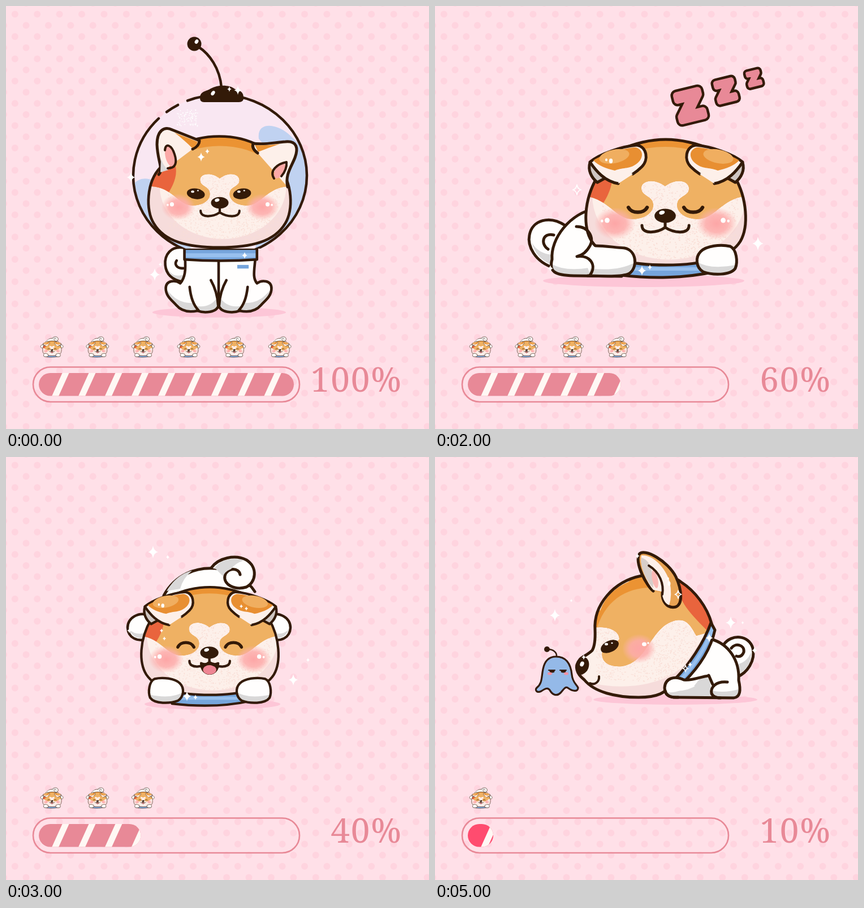
These frames come from a looping animation (748x748 px, 6000 ms). An HTML page with a canvas:

```html
<!DOCTYPE html>
<html lang="en">
<head>
<meta charset="utf-8">
<title>Puppy battery</title>
<style>
html, body { margin: 0; width: 100%; height: 100%; overflow: hidden; background: #ffe0e8; }
canvas { display: block; width: 100vw; height: 100vh; }
</style>
</head>
<body>
<canvas id="stage" width="748" height="748"></canvas>
<script>
const ctx = document.getElementById('stage').getContext('2d');
const INK = '#331a08', WHITE = '#fffefd', GRAY = '#d9d8d8', CREAM = '#fdf0ea', SHADE = '#f6dcdb';
const ORANGE = '#efb163', DEEP = '#eb9333', RED = '#e9643d', BLUE = '#76a5dc', SKY = '#98c0ee';
const PINK = '#e88997';

// ---- drawing helpers ----
function scope(fn) { ctx.save(); fn(); ctx.restore(); }
function fill(d, color) { ctx.fillStyle = color; ctx.fill(new Path2D(d)); }
function line(d, w = 5, color = INK) {
  ctx.lineWidth = w; ctx.strokeStyle = color; ctx.stroke(new Path2D(d));
}
function shape(d, color, w) { fill(d, color); line(d, w); }
function inside(d, fn) { scope(() => { ctx.clip(new Path2D(d)); fn(); }); }
function oval(x, y, rx, ry, color, turn = 0) {
  ctx.fillStyle = color;
  ctx.beginPath(); ctx.ellipse(x, y, rx, ry, turn, 0, 7); ctx.fill();
}
function box(x, y, w, h, color) { ctx.fillStyle = color; ctx.fillRect(x, y, w, h); }
function at(x, y, k, fn, px = 336, py = 271) {
  scope(() => { ctx.translate(x, y); ctx.scale(k, k); ctx.translate(-px, -py); fn(); });
}
function pair(cx, fn) {
  fn();
  scope(() => { ctx.translate(2 * cx, 0); ctx.scale(-1, 1); fn(); });
}
function starPath(x, y, r) {
  const q = r * 0.14, s = r * 0.82;
  return `M${x},${y - r} Q${x + q},${y - q} ${x + s},${y} Q${x + q},${y + q} ${x},${y + r}` +
    ` Q${x - q},${y + q} ${x - s},${y} Q${x - q},${y - q} ${x},${y - r}Z`;
}
function stars(...list) { for (const [x, y, r] of list) fill(starPath(x, y, r), '#fff'); }
function blush(x, y, rx, ry) {
  scope(() => {
    ctx.translate(x, y); ctx.scale(rx, ry);
    const g = ctx.createRadialGradient(0, 0, 0, 0, 0, 1);
    g.addColorStop(0, 'rgba(253,166,166,1)');
    g.addColorStop(0.55, 'rgba(253,172,171,.85)');
    g.addColorStop(1, 'rgba(253,180,178,0)');
    oval(0, 0, 1, 1, g);
  });
}
function speckle(x, y, w, h, n, color) {
  let seed = 7;
  const rnd = () => (seed = (seed * 16807) % 2147483647) / 2147483647;
  for (let i = 0; i < n; i++) box(x + rnd() * w, y + rnd() * h, 1.7, 1.4, color);
}
function eye(x, y, turn) {
  oval(x, y, 17, 10, INK, turn);
  oval(x - 6, y - 4, 3, 2.2, '#fff');
  oval(x + 4, y - 6, 1.6, 1.3, '#fff');
}
function shadow(x, y, rx, ry) { oval(x, y, rx, ry, '#fdc6d7'); }

// ---- front face, nose at 336,271 ----
const MASK = 'M180,242 L206,240 C248,242 258,276 285,276 C308,276 322,262 316,248 C312,240 299,239 299,228' +
  ' C299,216 319,212 336,225 C353,212 373,216 373,229 C373,239 361,240 356,248 C350,262 364,276 387,276' +
  ' C414,276 424,242 466,240 L500,242 L500,120 L180,120Z';

function coat() {
  box(150, 100, 380, 280, SHADE);
  oval(342, 240, 119, 99, CREAM);
  speckle(238, 220, 210, 122, 1300, '#f9ded6');
  fill(MASK, DEEP);
  inside(MASK, () => {
    oval(336, 268, 134, 104, ORANGE);
    fill('M180,260 H234 C246,244 257,222 253,203 L215,195Z', RED);
  });
}
function face(kind, by) {
  blush(258, by, 32, 25);
  blush(416, by, 32, 25);
  oval(246, by - 5, 3.8, 4, '#fff'); oval(238, by - 4, 2, 2.2, '#fff');
  oval(426, by - 5, 3.8, 4, '#fff'); oval(434, by - 4, 2, 2.2, '#fff');
  if (kind === 'open') {
    eye(291, 254, 0.15);
    eye(378, 254, -0.15);
  } else {
    const d = kind === 'sleep' ? 'M279,258 C284,268 303,268 308,258' : 'M279,261 C284,250 303,250 308,261';
    pair(336.5, () => line(d, 5.5));
  }
  if (kind === 'happy') {
    shape('M321,290 C321,315 352,315 352,290 Q344,294 336,288 Q329,294 321,290Z', INK, 4);
    oval(336.5, 302, 12, 8.5, '#ee8593');
  }
  oval(336, 271, 16.5, 11, INK);
  oval(331, 266, 4.5, 3, '#fff', -0.3);
  line('M336,280 V288 M300,286 C300,301 325,297 336,289 C348,297 373,301 373,286', 4.4);
}
function head(outline, x, y, k, kind, by) {
  inside(outline, () => at(x, y, k, coat));
  line(outline);
  at(x, y, k, () => face(kind, by));
}
const ROUND = 'M224,205 C198,232 196,285 212,310 C232,344 275,355 335,355 C396,355 439,344 459,310' +
  ' C475,285 473,232 447,205 C440,175 395,146 335,146 C275,146 232,175 224,205Z';

// ---- sitting front body ----
function sitting() {
  shadow(334, 476, 129, 10);
  shape('M268,352 C240,346 228,366 230,385 C232,405 246,414 264,417', WHITE);
  fill('M234,391 C244,409 255,405 265,404 L264,414 C250,412 239,406 234,391Z', GRAY);
  line('M265,391 C252,392 247,383 252,376');
  const body = 'M268,370 C270,395 268,409 259,420 C249,413 231,414 231,430 C231,445 243,453 251,462' +
    ' C262,475 278,476 292,473 C305,478 330,477 333,462 C336,477 361,478 374,473 C388,476 404,475 415,462' +
    ' C423,453 435,445 435,430 C435,414 417,413 407,420 C398,409 402,395 404,370Z';
  fill(body, WHITE);
  inside(body, () => pair(333, () => {
    fill('M225,425 C238,434 246,458 282,458 L294,480 L230,480Z', GRAY);
    fill('M292,464 Q316,468 330,448 L332,482 L290,482Z', GRAY);
  }));
  line(body);
  line('M333,377 V466');
  pair(333, () => line('M277,427 C279,446 284,462 294,472 M318,414 C327,430 331,446 332,462'));
  box(369, 384.5, 22, 7, BLUE);
  collar('M267,353 H407 V374 Q337,379 267,374Z', () => box(260, 362, 150, 8, SKY));
}
function collar(d, band) {
  fill(d, BLUE);
  inside(d, band);
  line(d);
}

// ---- scenes ----
function astronaut() {
  at(376, 429, 0.916, sitting, 333, 353);
  const glass = (a, b) => {
    ctx.beginPath();
    ctx.ellipse(378.5, 300, 153.5, 143, 0, a * Math.PI / 180, b * Math.PI / 180);
  };
  scope(() => {
    ctx.beginPath(); ctx.rect(200, 140, 360, 289); ctx.clip();
    glass(0, 360); ctx.fillStyle = '#f9e7f2'; ctx.fill();
    scope(() => {
      ctx.clip();
      fill('M447,235 C443,205 475,207 498,225 C516,240 532,260 540,290 L520,390 L440,435 L470,260Z', '#c0d2f1');
      fill('M220,322 C235,298 258,302 275,320 L330,435 L280,430Z', '#c0d2f1');
      speckle(302, 182, 36, 30, 90, '#fff');
    });
    ctx.lineWidth = 4.5; ctx.strokeStyle = INK;
    glass(-112, 225); ctx.stroke();
    glass(-128, -119); ctx.stroke();
  });
  at(378, 348, 0.94, () => head(ROUND, 336, 271, 1, 'open', 279));

  shape('M270,298 C279,288 268,275 267,245 C267,220 280,212 294,219 L342,238 C342,246 336,250 330,253', CREAM);
  fill('M298,224 L339,240 Q337,248 329,251 C320,242 309,232 298,224Z', DEEP);
  fill('M274,270 Q279,284 287,290 L273,294Z', GRAY);
  oval(291, 266, 9, 19, '#fba9a7', -0.25);
  line('M281,255 C282,241 293,246 298,262 C303,277 300,287 286,287', 4);
  shape('M445,260 C438,255 435,249 437,243 C458,246 475,241 494,240 C515,238 517,252 511,268 C505,284 493,298 498,320', CREAM);
  fill('M440,246 Q462,247 484,244 Q466,250 446,258Z', DEEP);
  oval(484, 291, 8, 15, '#fba9a7', 0.5);
  line('M474,305 C465,291 480,279 496,276 C497,287 492,295 487,301', 4);

  line('M381,144 C378,110 360,85 340,72', 4.5);
  oval(333, 67, 12.5, 12.5, INK);
  oval(337, 63, 3, 4, '#fff', 0.6);
  fill('M343,163 C343,150 355,151 362,146 C375,139 395,139 405,147 C415,150 420,152 420,163 Q420,170 412,170 H350 Q343,170 343,163Z', INK);
  oval(366, 154, 3, 4.5, '#fff', 0.6);
  stars([221, 303, 9], [345, 267, 8], [356, 257, 5], [263, 475, 11], [273, 457, 4], [422, 441, 6], [395, 147, 5], [410, 149, 8]);
}

function flagBearer() {
  sitting();
  head(ROUND, 336, 271, 1, 'open', 291);
  pair(335.5, () => {
    shape('M282,171 C298,162 303,152 296,151 L248,126 C238,121 228,119 221,128 C204,150 203,195 216,211 C228,216 240,213 242,205', DEEP);
    fill('M212,150 C206,175 209,196 218,208 Q230,211 239,206 Q222,185 224,155Z', '#e9a757');
    fill('M228,150 C236,133 256,138 277,163 L262,196 L242,205 C228,194 224,170 228,150Z', CREAM);
    oval(252, 176, 9, 20, '#fba9a7', -0.3);
    line('M227,149 C223,172 225,190 241,202 M239,164 C243,151 261,160 264,186 M229,203 Q238,201 242,206', 4);
  });
  oval(219, 169, 2.5, 4, '#fff'); oval(218, 179, 1.5, 2.2, '#fff');
  line('M458,353 L461,472');
  shape('M460,352 H545 V411 H461Z', WHITE);
  fill('M482,368 Q480,361 488,365 Q502,368 516,365 Q525,361 525,368 C529,387 524,399 512,399 L492,399 C479,398 478,386 482,368Z', SKY);
  stars([479, 219, 12], [446, 203, 8], [453, 193, 4], [255, 189, 4], [280, 365, 8], [291, 369, 5], [458, 354, 5], [492, 382, 8]);
}

// ---- lying puppy with folded ears ----
const LOW = 'M287,302 C262,345 262,392 277,416 C300,450 350,458 408,458 C468,458 520,448 540,416' +
  ' C555,390 552,340 530,302 C528,262 460,236 408,236 C356,236 290,262 287,302Z';
const PAW = 'M470,434 C480,424 505,421 522,425 C533,430 536,452 531,464 C522,477 490,476 474,470 C461,462 460,444 470,434Z';

function paw() {
  fill(PAW, WHITE);
  inside(PAW, () => fill('M455,446 Q480,470 540,456 L540,480 H460Z', GRAY));
  line(PAW);
}
function lowHead(kind) {
  collar('M330,452 H490 L494,470 C440,482 380,482 330,476Z', () => box(320, 462, 190, 6, SKY));
  head(LOW, 407, 371, 1.14, kind, 283);
  pair(409, () => {
    shape('M274,277 C270,290 276,303 287,312 L305,302', '#cfc6c2');
    shape('M324,314 C300,310 285,292 274,276 C290,262 330,248 357,246 C375,249 378,272 366,284 Q358,292 350,297', CREAM);
    fill('M350,297 L324,314 L330,290Z', CREAM);
    fill('M280,273 C300,260 340,250 355,250 C369,254 369,268 359,277 C344,290 335,284 318,291 C302,287 290,283 280,273Z', '#e88f32');
    oval(317, 266, 27, 12, '#f0ae60', -0.2);
  });
  oval(311, 274, 3.2, 4.2, '#fff'); oval(303, 272, 2, 2.6, '#fff');
}
function bubbleZ(x, y, size) {
  scope(() => {
    ctx.translate(x, y); ctx.rotate(-0.24);
    ctx.font = `bold ${size}px "DejaVu Sans", sans-serif`;
    ctx.textAlign = 'center';
    const base = size * 0.365, fat = size * 0.19;
    ctx.strokeStyle = INK; ctx.lineWidth = fat + 9; ctx.strokeText('Z', 0, base);
    ctx.strokeStyle = ctx.fillStyle = PINK; ctx.lineWidth = fat; ctx.strokeText('Z', 0, base);
    ctx.fillText('Z', 0, base);
  });
}
function sleeper() {
  shadow(369, 486, 178, 11);
  shape('M210,463 C176,452 163,424 167,405 C172,378 203,370 230,388', WHITE);
  fill('M171,418 Q182,438 208,440 L207,458 Q178,446 171,418Z', GRAY);
  line('M200,430 C186,421 190,400 210,405');
  const body = 'M285,358 C238,366 204,412 207,448 C201,470 212,476 245,477 L330,478 L340,360Z';
  fill(body, WHITE);
  inside(body, () => fill('M200,452 Q225,471 272,463 L282,480 H200Z', GRAY));
  line(body);
  lowHead('sleep');
  const arm = 'M284,424 C300,424 318,427 335,428 C356,432 359,460 345,472 C335,479 305,478 275,477 L262,440Z';
  fill(arm, WHITE);
  inside(arm, () => fill('M275,464 Q325,470 356,452 L356,480 H270Z', GRAY));
  line('M284,424 C300,424 318,427 335,428 C356,432 359,460 345,472 C335,479 305,478 270,477');
  line('M250,390 C272,390 282,410 274,424 C268,435 260,441 251,443 C274,440 287,458 274,476');
  paw();
  bubbleZ(451, 176, 63); bubbleZ(514, 150, 46); bubbleZ(564, 128, 31);
  line(starPath(251, 325, 9), 1.6, '#fff');
  stars([571, 420, 12], [366, 468, 9], [380, 462, 5], [204, 464, 6]);
}
function happyPup() {
  shape('M279,245 C298,210 335,192 378,198 C400,201 425,215 440,238', WHITE);
  fill('M284,237 C298,214 315,204 329,201 Q313,214 308,233Z', GRAY);
  shape('M363,196 C376,178 405,172 425,182 C446,195 442,222 425,230 C405,236 384,226 387,210 C391,195 412,195 414,208', WHITE);
  fill('M369,196 C380,181 402,177 420,183 Q405,188 398,198 Q386,203 384,211Z', GRAY);
  pair(359, () => {
    shape('M252,280 C235,273 215,284 215,302 C216,320 232,327 250,322', WHITE, 4.5);
    fill('M218,305 Q230,317 250,310 L250,320 Q225,324 218,305Z', GRAY);
  });
  at(360.5, 346, 1 / 1.165, () => {
    lowHead('happy');
    pair(408, paw);
  }, 408, 371);
}
function happyScene() {
  shadow(365, 437, 120, 10);
  happyPup();
  stars([260, 168, 11], [286, 177, 4], [508, 394, 10], [534, 359, 4], [320, 423, 9], [335, 425, 5],
    [218, 307, 5], [275, 307, 4], [280, 321, 4], [416, 264, 4], [425, 268, 4]);
}

// ---- side views ----
function planet() {
  const ball = 'M398,128 a81,81 0 1 1 162,0 a81,81 0 1 1 -162,0Z';
  fill(ball, PINK);
  inside(ball, () => {
    fill('M390,95 C440,142 490,160 565,158 V215 H390Z', '#d77489');
    line('M485,52 Q538,60 553,108', 2, '#fff');
  });
  line(ball);
  line('M420,68 C392,59 377,72 385,88 C400,116 475,166 545,177 C576,181 592,167 583,152 Q574,135 559,127');
  line('M454,120 C457,110 469,112 471,123 M486,136 C489,126 501,128 503,139', 4);
  blush(439, 114, 11, 10); blush(511, 152, 11, 10);
  oval(436, 111, 2, 2, '#fff'); oval(513, 150, 2, 2, '#fff');
  stars([442, 76, 8], [460, 73, 5]);
}
function gazer() {
  shadow(294, 547, 132, 8);
  shape('M218,464 C206,445 170,448 165,480 C163,508 183,530 206,539', WHITE);
  fill('M169,492 Q180,510 205,505 L203,533 Q175,520 169,492Z', GRAY);
  line('M207,496 C198,503 186,498 188,485 Q191,476 200,477');
  const body = 'M243,443 C220,462 205,495 205,518 C199,540 208,545 230,545 L368,548 C386,546 388,518 370,516 C383,495 388,470 387,443Z';
  fill(body, WHITE);
  inside(body, () => {
    fill('M200,526 Q230,540 264,526 L262,550 H200Z', GRAY);
    fill('M276,518 Q292,538 345,528 L386,530 L384,552 H280Z', GRAY);
  });
  line(body);
  line('M246,463 C278,466 279,494 253,515 C277,513 280,536 264,544 M291,482 C277,505 282,522 281,536 Q284,546 300,546' +
    ' M341,483 C331,497 334,506 327,517 C345,513 349,530 338,546 M371,516 C364,530 354,540 344,546');
  box(347, 463, 22, 7.5, SKY);
  collar('M243,424 H387 V446 Q315,450 243,446Z', () => box(240, 434, 150, 7, SKY));

  const skull = 'M243,424 C212,400 199,350 207,306 C212,275 224,262 232,248 C246,224 275,212 312,212 C368,214 405,242 417,276' +
    ' Q423,296 432,304 Q443,309 455,311 C474,313 482,330 470,360 C456,392 425,420 385,425 Q310,428 243,424Z';
  const orange = 'M230,356 C243,311 285,311 305,332 C335,362 395,370 418,345 C428,330 420,314 400,310 Q380,312 377,295' +
    ' C378,280 398,271 422,281 L440,200 H190 V356Z';
  inside(skull, () => {
    box(190, 200, 300, 240, SHADE);
    fill('M230,310 L490,290 V350 C455,395 380,418 325,409 C270,402 240,385 230,310Z', CREAM);
    speckle(236, 310, 205, 92, 1100, '#f9ded6');
    fill(orange, DEEP);
    inside(orange, () => fill('M225,380 C228,270 265,235 315,233 C375,236 408,265 425,300 L420,380Z', ORANGE));
    fill('M190,240 H238 C240,265 240,290 241,308 C236,340 224,365 225,400 L190,410Z', RED);
    line('M300,216 Q350,214 382,238', 3, '#fff');
  });
  line(skull);
  blush(350, 341, 32, 23);
  oval(339, 337, 4, 4, '#fff'); oval(332, 339, 2, 2, '#fff');
  eye(402, 313, 0.28);
  line('M386,308 L391,305', 3);
  fill('M450,312 C462,306 481,314 479,336 Q477,347 471,347 C457,344 450,330 450,312Z', INK);
  oval(464, 320, 5, 3, '#fff');
  line('M445,355 C447,364 460,366 468,361', 4);

  shape('M234,265 C231,225 254,180 270,176 C284,175 285,198 288,215 C292,233 293,241 287,246 C279,250 270,254 269,261' +
    ' C276,282 270,297 256,297 C241,295 234,281 234,265Z', '#e49845');
  fill('M263,205 C268,186 278,192 283,212 C288,230 289,240 284,244 C275,249 268,252 266,258 Q273,285 262,292 C252,265 250,235 263,205Z', CREAM);
  fill('M272,198 Q279,188 284,220 Q288,236 283,240 Q268,232 272,198Z', '#d8ceca');
  oval(269, 240, 5, 16, '#fbb8b4');
  line('M268,204 C256,232 258,248 271,266', 4);
  oval(245, 263, 3, 4, '#fff'); oval(250, 272, 2, 2.5, '#fff');
  planet();
  stars([215, 435, 11], [222, 310, 5], [362, 434, 5], [379, 441, 8], [204, 531, 6], [195, 518, 4]);
}

function visitor() {
  line('M215,353 C216,345 208,340 200,340', 2.5);
  oval(198, 340, 5, 5, INK);
  shape('M214,353 C232,353 240,365 242,385 C243,398 250,402 253,408 C253,416 243,414 236,409 C230,404 227,412 222,417' +
    ' C215,424 208,420 204,414 C200,406 194,410 188,414 C180,418 176,412 180,408 C190,400 188,390 191,375' +
    ' C194,360 202,353 214,353Z', '#94b9e8', 3.2);
  for (const x of [207, 227]) {
    oval(x, 379, 4.5, 2.5, INK);
    line(`M${x - 6},377 H${x + 5}`, 2);
  }
  oval(203, 383, 4, 2.5, '#f391a4'); oval(232, 383, 4, 2.5, '#f391a4');
}
function sniffer() {
  shadow(425, 429, 145, 9);
  visitor();
  shape('M511,331 C524,313 555,314 562,338 C567,360 552,382 534,389', WHITE);
  fill('M537,366 Q552,362 559,345 Q560,370 540,382Z', GRAY);
  line('M524,338 C531,328 548,332 546,345 Q542,355 533,352');
  const body = 'M488,322 C518,330 539,358 537,395 C541,412 540,425 528,426 L430,425 C414,426 406,420 406,408' +
    ' C407,390 424,388 440,394 L460,360Z';
  fill(body, WHITE);
  inside(body, () => {
    fill('M400,411 Q440,420 465,402 L488,404 V430 H400Z', GRAY);
    fill('M488,413 Q515,419 545,408 V430 H490Z', GRAY);
    fill('M470,390 Q482,384 488,400 L486,405 H458Z', GRAY);
  });
  line(body);

  const skull = 'M365,210 C315,220 280,262 283,306 Q284,332 278,342 C270,350 262,352 256,358 C246,370 250,383 264,394' +
    ' C282,416 320,425 360,425 C390,425 410,420 427,391 C450,366 480,330 489,294 C481,265 460,237 435,221 C415,206 390,205 365,210Z';
  const orange = 'M270,304 C300,296 326,305 326,322 C320,332 305,325 297,341 C291,358 303,372 330,370' +
    ' C377,364 380,300 425,289 C446,285 453,300 462,316 L520,300 V190 H270Z';
  inside(skull, () => {
    box(240, 200, 260, 235, SHADE);
    fill('M230,330 L330,280 H500 L440,370 C400,405 330,414 270,398Z', CREAM);
    speckle(285, 285, 180, 112, 1100, '#f9ded6');
    fill(orange, DEEP);
    inside(orange, () => fill('M280,330 C290,265 325,235 375,231 C440,222 490,250 510,330 V390 H280Z', ORANGE));
    fill('M425,210 C430,260 452,276 484,310 L510,300 L480,205Z', RED);
    line('M291,270 C300,245 320,228 342,219', 3, '#fff');
  });
  line(skull);
  collar('M488,293 C475,330 448,368 426,391 L441,397 C466,372 487,342 495,306Z',
    () => line('M492,300 C478,340 455,373 434,394', 6, SKY));
  fill('M440,392 Q424,388 412,397 Q404,408 412,416 Q432,418 455,400Z', WHITE);
  line('M484,387 C470,388 456,396 440,394 C424,386 407,391 406,408 C406,421 414,426 430,425');
  line('M484,386 L491,402 M517,398 C497,396 487,407 489,418 Q492,426 505,426');
  blush(361, 339, 30, 26);
  oval(370, 331, 4, 3.6, '#fff'); oval(377, 329, 1.8, 1.8, '#fff');
  eye(309, 335, -0.45);
  fill('M262,353 C273,355 275,368 269,378 Q262,386 256,385 C245,378 245,360 262,353Z', INK);
  oval(260, 366, 3.5, 4.5, '#fff', 0.4);
  line('M290,388 C291,398 282,404 274,400', 4);

  shape('M386,237 C374,228 353,188 361,172 C370,160 412,184 426,212 C437,236 438,260 426,265 C409,269 401,253 402,240', '#e9a353');
  fill('M365,174 C385,172 407,195 415,220 Q420,245 414,262 C404,258 402,246 401,238 L386,235 C375,222 361,192 365,174Z', CREAM);
  fill('M365,178 C380,182 386,200 386,232 C374,220 362,194 365,178Z', '#d8ceca');
  oval(389, 216, 5, 16, '#fbb8b4', -0.2);
  line('M378,192 C398,204 405,225 402,243', 4);
  oval(414, 224, 2.5, 4, '#fff'); oval(412, 215, 1.8, 2.2, '#fff');
  line(starPath(430, 243, 7), 1.6, '#fff');
  line(starPath(443, 374, 6), 1.4, '#fff');
  stars([212, 280, 11], [241, 254, 3], [523, 293, 11], [544, 293, 3], [485, 320, 8], [451, 367, 5], [565, 342, 6], [263, 354, 5], [358, 175, 5]);
}

// ---- backdrop and meter ----
function backdrop() {
  box(0, 0, 748, 748, '#ffe0e8');
  const step = 39.4;
  for (let i = -1; i < 20; i++) {
    for (let j = -1; j < 20; j++) {
      for (const half of [0, step / 2]) {
        oval(35.5 + i * step + half, 34.3 + j * step + half, 6, 6, '#ffd4df');
      }
    }
  }
}
function meter(percent, pups) {
  for (let i = 0; i < pups; i++) at(81 + 80.6 * i, 603, 0.138, happyPup, 358, 308);
  ctx.lineWidth = 2.6; ctx.strokeStyle = PINK;
  ctx.beginPath(); ctx.roundRect(48, 638.5, 471, 61.5, 30.7); ctx.stroke();
  scope(() => {
    ctx.beginPath(); ctx.roundRect(58, 649, 4.51 * percent, 40.5, 20.2); ctx.clip();
    box(58, 649, 460, 41, percent > 20 ? PINK : percent > 10 ? '#ffd451' : '#ff4c6f');
    for (let i = 0; i < 9; i++) {
      const x = 81 + 46.9 * i;
      fill(`M${x},690 L${x + 19},648 h12 L${x + 12},690Z`, '#fff8f4');
    }
  });
  scope(() => {
    ctx.font = '500 60px "Noto Serif", serif';
    ctx.letterSpacing = '2px';
    ctx.textAlign = 'right';
    ctx.fillStyle = PINK;
    ctx.fillText(percent + '%', 701, 682);
  });
}

const scenes = [[100, astronaut], [80, flagBearer], [60, sleeper], [40, happyScene], [20, gazer], [10, sniffer]];
const HOLD = 1000;
let shown = -1;

function tick() {
  const now = Math.floor(performance.now() / HOLD) % scenes.length;
  if (now !== shown) {
    shown = now;
    ctx.lineCap = ctx.lineJoin = 'round';
    const [percent, draw] = scenes[now];
    backdrop();
    meter(percent, scenes.length - now);
    draw();
  }
  requestAnimationFrame(tick);
}
tick();
</script>
</body>
</html>
```
